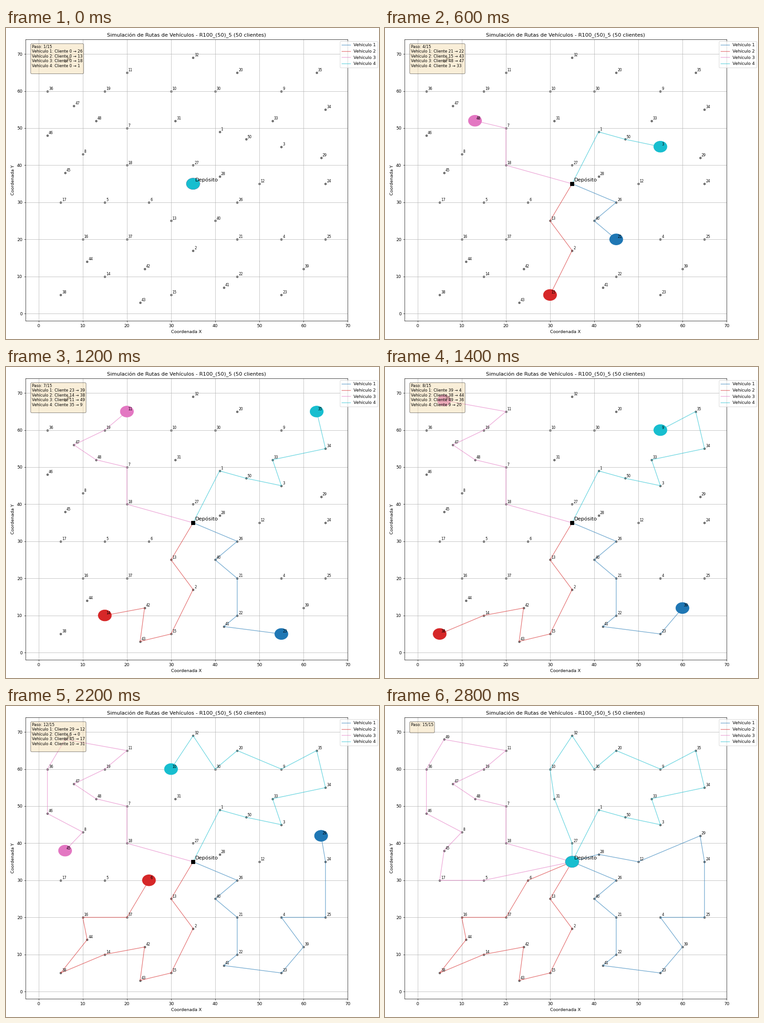
Animation, 820 px wide and 683 px high, one loop 3 s. Source, as a matplotlib script:

```python
import matplotlib.pyplot as plt
from matplotlib.animation import FuncAnimation
from matplotlib.patches import Circle

W, H = 820, 683
DPI = W / 12
STEPS, STEP_MS = 15, 200

# Index 0 is the depot, the rest are clients
NODES = [
    (35, 35), (41, 49), (35, 17), (55, 45), (55, 20), (15, 30), (25, 30),
    (20, 50), (10, 43), (55, 60), (30, 60), (20, 65), (50, 35), (30, 25),
    (15, 10), (30, 5), (10, 20), (5, 30), (20, 40), (15, 60), (45, 65),
    (45, 20), (45, 10), (55, 5), (65, 35), (65, 20), (45, 30), (35, 40),
    (41, 37), (64, 42), (40, 60), (31, 52), (35, 69), (53, 52), (65, 55),
    (63, 65), (2, 60), (20, 20), (5, 5), (60, 12), (40, 25), (42, 7),
    (24, 12), (23, 3), (11, 14), (6, 38), (2, 48), (8, 56), (13, 52),
    (6, 68), (47, 47),
]
ROUTES = [
    [0, 26, 40, 21, 22, 41, 23, 39, 4, 25, 24, 29, 12, 28, 0],
    [0, 13, 2, 15, 43, 42, 14, 38, 44, 16, 37, 6, 0],
    [0, 18, 7, 48, 47, 19, 11, 49, 36, 46, 8, 45, 17, 5, 0],
    [0, 1, 50, 3, 33, 34, 35, 9, 20, 30, 32, 10, 31, 27, 0],
]
COLORS = ["tab:blue", "tab:red", "tab:pink", "tab:cyan"]

plt.rcParams["font.family"] = "DejaVu Sans"
fig = plt.figure(figsize=((W + 0.01) / DPI, (H + 0.01) / DPI), dpi=DPI)
left, right, top, bottom = 42.6, 750.9, 24.6, 643.3
ax = fig.add_axes([left / W, 1 - bottom / H, (right - left) / W, (bottom - top) / H])
ax.set_xlim(-3, 70)
ax.set_ylim(-2, 74)
ax.grid(True)
ax.set_title("Simulación de Rutas de Vehículos - R100_(50)_5 (50 clientes)")
ax.set_xlabel("Coordenada X")
ax.set_ylabel("Coordenada Y")


def label(text, xy, offset, size):
    ax.annotate(text, xy, xytext=(offset, offset),
                textcoords="offset points", fontsize=size)


ax.scatter(*zip(*NODES[1:]), c="black", s=20, alpha=0.5)
ax.plot(*NODES[0], "ks", markersize=8, zorder=2.5)
label("Depósito", NODES[0], 5, 12)
for i, xy in enumerate(NODES[1:], 1):
    label(str(i), xy, 3, 8)

lines, cars = [], []
for i, color in enumerate(COLORS, 1):
    lines += ax.plot([], [], color=color, alpha=0.6, lw=1.5, label=f"Vehículo {i}")
    cars.append(ax.add_patch(Circle(NODES[0], 1.5, color=color, zorder=2.8)))

info = ax.text(0.02, 0.98, "", transform=ax.transAxes, fontsize=9, va="top",
               bbox=dict(boxstyle="round", facecolor="wheat", alpha=0.5))
ax.legend(loc="upper right", bbox_to_anchor=(1.1, 1))


def update(step):
    text = f"Paso: {step + 1}/{STEPS}\n"
    for i, (route, line, car) in enumerate(zip(ROUTES, lines, cars), 1):
        pos = min(step, len(route) - 1)
        line.set_data(*zip(*(NODES[n] for n in route[:pos + 1])))
        car.center = NODES[route[pos]]
        if step < len(route) - 1:
            text += f"Vehículo {i}: Cliente {route[step]} → {route[step + 1]}\n"
    info.set_text(text)
    return [*lines, *cars, info]


anim = FuncAnimation(fig, update, frames=STEPS, interval=STEP_MS,
                     init_func=lambda: update(0), repeat=True, repeat_delay=0)
plt.show()
```
